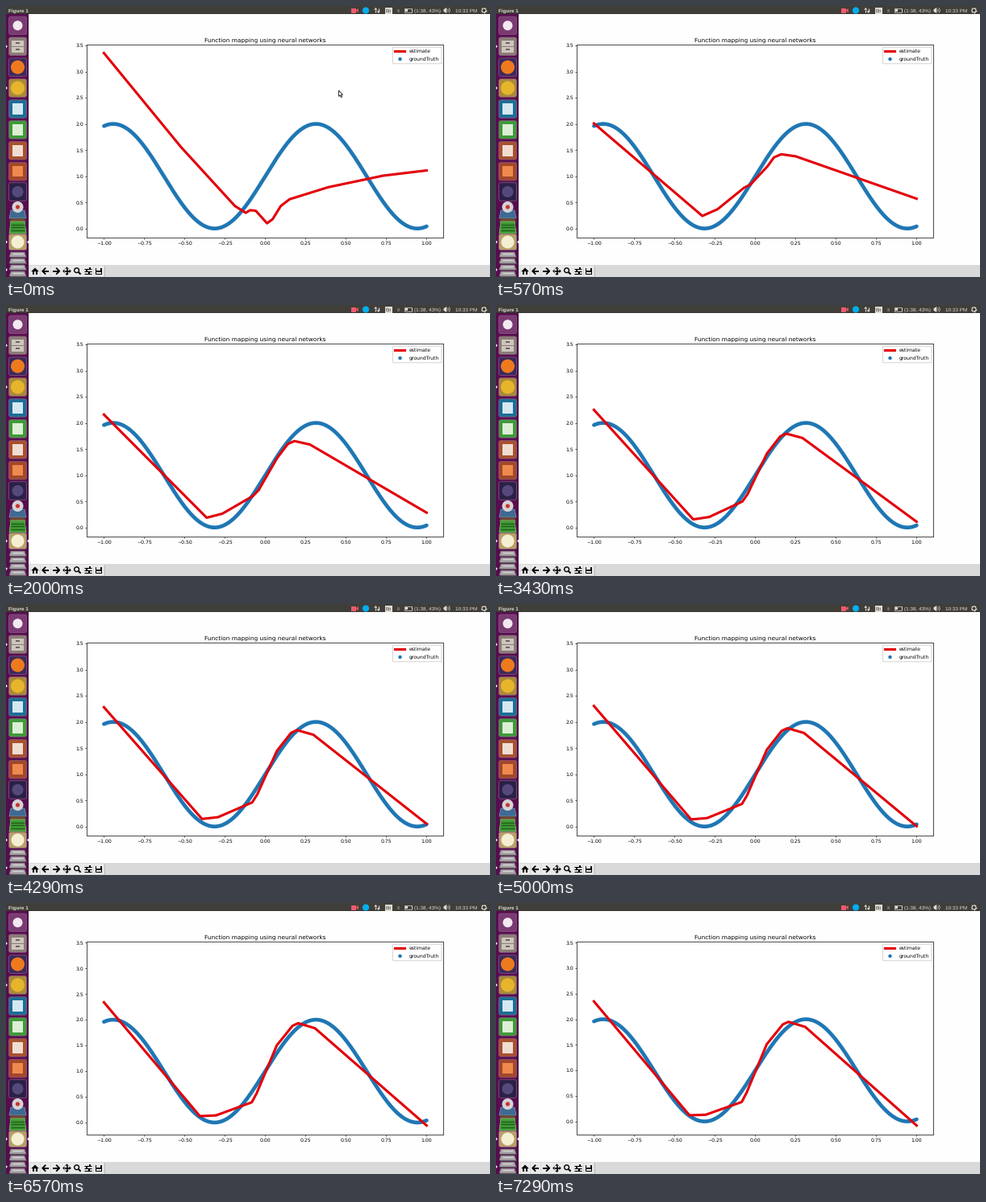
These frames come from a looping animation (600x337 px, 8 s). A matplotlib script:

```python
import numpy as np
import matplotlib.pyplot as plt
from matplotlib.animation import FuncAnimation
from matplotlib.patches import Circle, FancyBboxPatch, Polygon, Rectangle

W, H = 600, 337
LOOP, INTERVAL = 8000, 50
PX = 0.72          # points per pixel at 100 dpi
SHRINK = 0.439     # the desktop is scaled down to the stage
RED, BLUE = "#e3000b", "#1f77b4"
LIGHT, PANEL = "#dfdbd2", "#403e39"

plt.rcParams["text.hinting"] = "none"
fig = plt.figure(figsize=(W / 100, H / 100), dpi=100, facecolor="#fefefe")


def stage(z):
    """Transparent axes measured in stage pixels, y pointing down."""
    ax = fig.add_axes([0, 0, 1, 1], zorder=z)
    ax.set(xlim=(0, W), ylim=(H, 0))
    ax.axis("off")
    return ax


ui, over = stage(0), stage(2)


def rect(x, y, w, h, color):
    ui.add_patch(Rectangle((x, y), w, h, fc=color, lw=0))


def disc(x, y, r, color, ax=ui):
    ax.add_patch(Circle((x, y), r, fc=color, lw=0))


def poly(points, color, ax=ui, edge="none", lw=0.0):
    return ax.add_patch(Polygon(points, fc=color, ec=edge, lw=lw * PX))


def line(xs, ys, color, lw=1.0, ax=ui, cap="butt"):
    ax.plot(xs, ys, color=color, lw=lw * PX, solid_capstyle=cap)


def text(x, y, s, size, color="black", ax=ui, ha="left", va="baseline", **kw):
    return ax.text(x, y, s, fontsize=size, color=color, ha=ha, va=va, **kw)


# ---------- desktop: top panel ----------
def draw_panel():
    rect(0, 0, W, 10, PANEL)
    rect(0, 9, W, 1, "#383631")
    font = dict(family="Liberation Sans", va="center_baseline")
    text(3, 5.3, "Figure 1", 4.6, LIGHT, weight="bold", **font)
    text(506, 5.3, "(1:38, 43%)", 4.55, LIGHT, **font)
    text(557, 5.3, "10:33 PM", 4.55, LIGHT, **font)

    rect(427.5, 2.6, 6, 6, "#ee5a6f")
    poly([(433.5, 5.6), (436.7, 3), (436.7, 8.2)], "#ee5a6f")
    disc(446, 5.5, 4.1, "#00aff0")
    for x, tip, way in ((458.3, 1.8, 1), (461.8, 9.2, -1)):
        neck = tip + 3 * way
        line([x, x], [neck, tip + 6.4 * way], LIGHT, 1.2)
        poly([(x, tip), (x - 2, neck), (x + 2, neck)], LIGHT)
    rect(469.5, 1.6, 9.6, 8, LIGHT)
    text(474.3, 5.6, "En", 4.3, PANEL, ha="center", **font)
    rect(484.5, 3.5, 3, 4, "#6c6a64")
    ui.add_patch(Rectangle((494, 3), 8.6, 5.2, fc="none", ec=LIGHT, lw=0.7 * PX))
    rect(495, 4, 3.3, 3.2, LIGHT)
    rect(503, 4.4, 1, 2.4, LIGHT)
    poly([(542.5, 4.2), (546.3, 2), (546.3, 9), (542.5, 6.8)], LIGHT)
    a = np.linspace(-0.8, 0.8, 12)
    for r in (2.2, 4.2):
        line(546 + r * np.cos(a), 5.5 + r * np.sin(a), LIGHT, 0.7)
    for a in np.arange(4) * np.pi / 4:
        c, s = 3.7 * np.cos(a), 3.7 * np.sin(a)
        line([592.5 - c, 592.5 + c], [5.5 - s, 5.5 + s], LIGHT, 1.1)
    ui.add_patch(Circle((592.5, 5.5), 2.5, fc=PANEL, ec=LIGHT, lw=1.1 * PX, zorder=3))


# ---------- desktop: launcher ----------
def tile(y, color, h=22.5):
    ui.add_patch(FancyBboxPatch((5, y - h / 2 + 1.5), 19, h - 3, fc=color, ec="#8d5a85",
                                lw=0.7 * PX, boxstyle="round,pad=1.5,rounding_size=2.5"))


def sheet(y, h, color, edge):
    poly([(6, y), (23, y), (25, y + h), (4, y + h)], color, edge=edge, lw=0.6)


def draw_launcher():
    rect(0, 10, 28, H, "#560d4e")
    rect(27, 10, 1, H, "#3b0834")

    rounds = [("#7a3a72", "#f3e9f1", 6), ("#8b7d76", "#c9c1ba", 0), ("#3c2a5c", "#ee7a1e", 8.5),
              ("#a98a3c", "#e6b52c", 8.5)]
    squares = [("#1c6f96", "#d5e8f1"), ("#3f9a3a", "#dcefd4"), ("#a8512f", "#f0ddd2"),
               ("#a2482a", "#ee8a4e")]
    for k, (base, mark, r) in enumerate(rounds):
        tile(24.3 + 25.9 * k, base)
        disc(14.5, 24.3 + 25.9 * k, r, mark)
    for y in (42.5, 50.5):
        rect(7, y, 15, 7, "#cdc6bf")
        rect(12, y + 2.5, 5, 1.6, "#6f645d")
    for k, (base, mark) in enumerate(squares):
        y = 128 + 25.9 * k
        tile(y, base)
        rect(8.3, y - 6.8, 12.5, 13.6, mark)
    tile(231, "#2a2146")
    disc(14.5, 231, 7, "#55497c")

    # folded icons at the foot
    sheet(254, 10, "#3d6a94", "#8fa0ae")
    disc(14.5, 250, 7, "#d5d3d6")
    disc(14.5, 250, 2.6, "#c8342c")
    sheet(264, 5, "#6d4a35", "none")
    sheet(268, 15, "#3f9b33", "#9fd08a")
    for y in (271.5, 275, 278.5):
        line([6, 23], [y, y], "#1f5a1c", 1.3)
    tile(293.5, "#b7a069", 20)
    disc(14.5, 293.5, 8, "#f4efd2")
    for y in range(306, 331, 8):
        sheet(y, 6, "#a9a6a8", "#6e5b6b")
        line([8, 21], [y + 1.6, y + 1.6], "#dad8da", 1.2)
        line([4.5, 24.5], [y + 6, y + 6], "#5f5a5f", 1)

    for y in (50.3, 102, 293.5, 328):
        poly([(0, y - 2), (2, y), (0, y + 2)], "#f0e8ee")
    poly([(28, 291.5), (26, 293.5), (28, 295.5)], "#f0e8ee")


# ---------- figure toolbar ----------
def arrow(x, y, dx):
    line([x - 4.2 * dx, x + 3 * dx], [y, y], "black", 2)
    line([x, x + 4 * dx, x], [y - 4, y, y + 4], "black", 1.8)


def draw_toolbar():
    rect(28, 322, W, 15, "#d9d9d9")
    for k in range(7):
        rect(29.6 + 13.15 * k, 322.8, 12.6, 13.6, "#e9e9e9")
    line([121.6, 121.6], [322.5, 336.5], "#b5b5b5", 0.8)
    y = 329.7
    poly([(31.2, y + 0.5), (36, y - 4.2), (40.8, y + 0.5)], "black")
    rect(32.6, y + 0.3, 2.4, 3.9, "black")
    rect(37, y + 0.3, 2.4, 3.9, "black")
    arrow(49.2, y, -1)
    arrow(62.2, y, 1)
    for c, s in ((1, 0), (-1, 0), (0, 1), (0, -1)):
        x2, y2 = 75.5 + 3 * c, y + 3 * s
        line([75.5, x2], [y, y2], "black", 1.6)
        poly([(75.5 + 5.3 * c, y + 5.3 * s), (x2 - 2.4 * s, y2 - 2.4 * c),
              (x2 + 2.4 * s, y2 + 2.4 * c)], "black")
    ui.add_patch(Circle((87.6, y - 1), 2.9, fc="none", ec="black", lw=1.4 * PX))
    line([89.8, 92.6], [y + 1.2, y + 4], "black", 2)
    for dy, knob in ((-3, 104), (0, 99.8), (3, 103)):
        line([97.4, 106.4], [y + dy, y + dy], "black", 1.1)
        rect(knob - 0.9, y + dy - 1.3, 1.8, 2.6, "black")
    rect(110.6, y - 4.2, 8.6, 8.4, "black")
    rect(112.4, y - 3.3, 4.4, 2.6, "#e9e9e9")
    rect(112, y + 0.8, 5.8, 2.6, "#e9e9e9")


# ---------- plot ----------
LEFT, TOP, WIDTH, HEIGHT = 100.4, 47.6, 442, 240
PEAK = 3.355

plot = fig.add_axes([LEFT / W, 1 - (TOP + HEIGHT) / H, WIDTH / W, HEIGHT / H], zorder=1)
plot.set(xlim=(-1.105, 1.105), xticks=np.arange(-1, 1.01, 0.25), yticks=np.arange(0, 3.6, 0.5))
plot.tick_params(labelsize=10 * SHRINK, length=3.5 * SHRINK, pad=3.5 * SHRINK, width=0.5)
for side in plot.spines.values():
    side.set(linewidth=PX, edgecolor="#4c4c4c")
xs = np.linspace(-1, 1, 400)
plot.plot(xs, 1 + np.sin(5 * xs), color=BLUE, lw=4.7 * PX, solid_capstyle="round")
estimate, = plot.plot([], [], color=RED, lw=3.1 * PX, solid_capstyle="projecting",
                      solid_joinstyle="round")


def draw_legend():
    text(321.5, 44.2, "Function mapping using neural networks", 12 * SHRINK,
         ax=over, ha="center")
    over.add_patch(FancyBboxPatch((480.2, 51.8), 59.2, 19.4, fc="white", ec="#cccccc",
                                  lw=0.6, boxstyle="round,pad=0.6,rounding_size=1.2"))
    line([482.2, 494.4], [56.4, 56.4], RED, 3.1, over, "projecting")
    disc(488.5, 66, 2.2, BLUE, over)
    text(499.2, 58.1, "estimate", 10 * SHRINK, ax=over)
    text(499.2, 67.4, "groundTruth", 10 * SHRINK, ax=over)


# Corners of the fitted curve: untrained, after the first redraw, after the last one.
UNTRAINED = np.array([
    (-1, PEAK), (-0.523, 1.56), (-0.188, 0.43), (-0.121, 0.3), (-0.094, 0.35), (-0.059, 0.34),
    (0.011, 0.1), (0.046, 0.18), (0.096, 0.43), (0.151, 0.56), (0.391, 0.79), (0.73, 1.01),
    (1, 1.11)])
FIRST = np.array([
    (-1, 2.01), (-0.328, 0.24), (-0.233, 0.37), (-0.069, 0.78), (-0.03, 0.84), (0.076, 1.19),
    (0.116, 1.36), (0.161, 1.42), (0.251, 1.38), (1, 0.57)])
LAST = np.array([
    (-1, 2.35), (-0.408, 0.12), (-0.308, 0.13), (-0.084, 0.38), (-0.054, 0.56), (0.071, 1.51),
    (0.171, 1.9), (0.206, 1.95), (0.31, 1.85), (1, -0.08)])

TICK = LOOP / 56
REDRAWS = [2, 8, 14, 19, 24, 29, 35, 40, 46, 51]   # in ticks
DECAY = 0.25


def fitted(tick):
    """Corners after the latest redraw; learning slows down exponentially."""
    epoch = sum(tick >= r for r in REDRAWS) - 1
    if epoch < 0:
        return UNTRAINED.T
    learned = np.expm1(-DECAY * epoch) / np.expm1(-DECAY * (len(REDRAWS) - 1))
    return (FIRST + (LAST - FIRST) * learned).T


POINTER = np.array([(0, 0), (0, 7.4), (1.7, 5.9), (2.9, 8.6), (4.1, 8), (2.9, 5.5), (5, 5.4)])

draw_panel()
draw_launcher()
draw_toolbar()
draw_legend()
pointer = poly(POINTER, "white", over, "#222222", 0.9)
coords = text(589, 331.5, "x=0.592     y=2.86", 10 * SHRINK, ax=over, ha="right")


def update(i):
    tick = int(((i + 1) * INTERVAL - 1) / TICK)
    x, y = fitted(tick)
    estimate.set_data(x, y)
    low = min(0, y.min())
    pad = 0.05 * (PEAK - low)
    plot.set_ylim(low - pad, PEAK + pad)

    moved = tick == 3
    pointer.set_xy(POINTER + ((440, 91) if moved else (412.5, 105)))
    pointer.set_visible(tick <= 3)
    coords.set_visible(moved)
    return estimate, pointer, coords


anim = FuncAnimation(fig, update, frames=LOOP // INTERVAL, interval=INTERVAL, repeat=True)
plt.show()
```
